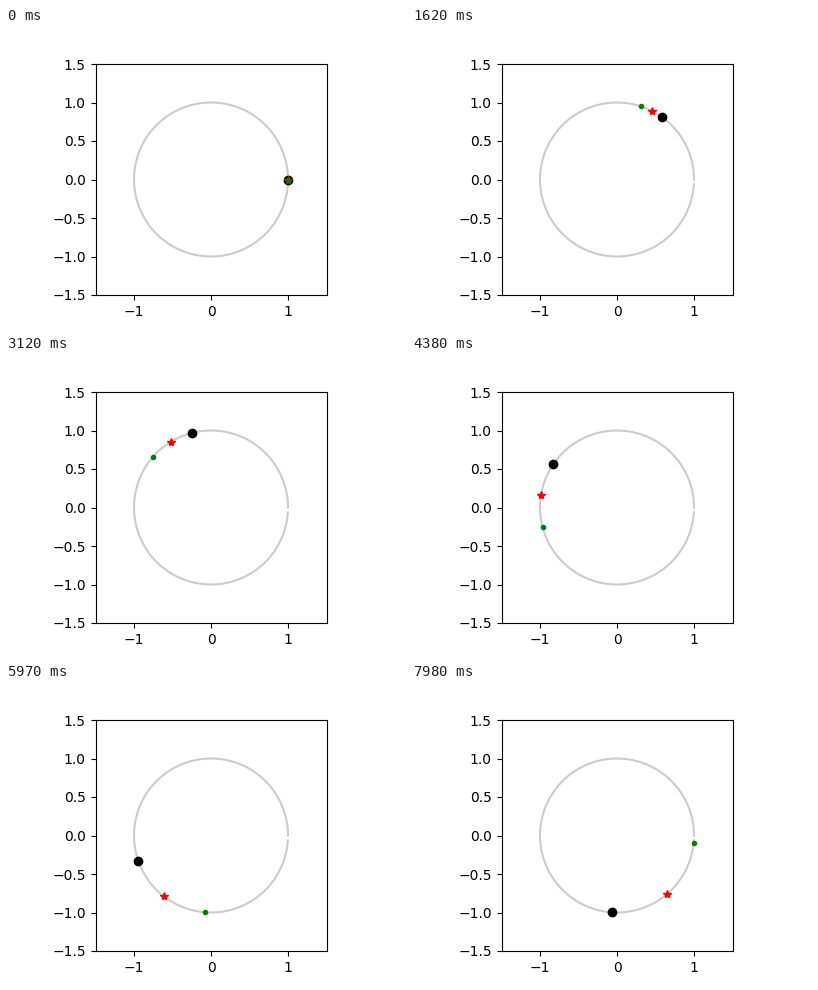
A matplotlib script that plays this animation: 400 px wide and 300 px high, repeating every 8 s.

```python
import numpy as np
import matplotlib.pyplot as plt
from matplotlib.animation import FuncAnimation

LOOP_MS = 8000
INTERVAL = 20
STEP_MS = 30
SPEEDS = (1, 7 / 6, 4 / 3)  # degrees per step

fig, ax = plt.subplots(figsize=(4, 3), dpi=100)
ax.set_aspect("equal")
ax.set_xlim(-1.5, 1.5)
ax.set_ylim(-1.5, 1.5)
ax.set_xticks([-1, 0, 1])
ax.set_yticks(np.arange(-1.5, 1.6, 0.5))

# The orbit is left open just below angle zero
theta = np.linspace(0, 2 * np.pi, 100, endpoint=False)
ax.plot(np.cos(theta), np.sin(theta), color="0.8", lw=1.5)

bodies = [ax.plot([1], [0], style)[0] for style in ("ko", "r*", "g.")]


def update(i):
    step = (i * INTERVAL + INTERVAL // 2) // STEP_MS
    for body, speed in zip(bodies, SPEEDS):
        angle = np.radians(speed * step)
        body.set_data([np.cos(angle)], [np.sin(angle)])
    return bodies


anim = FuncAnimation(fig, update, frames=LOOP_MS // INTERVAL,
                     interval=INTERVAL, repeat=True, repeat_delay=0)
plt.show()
```
